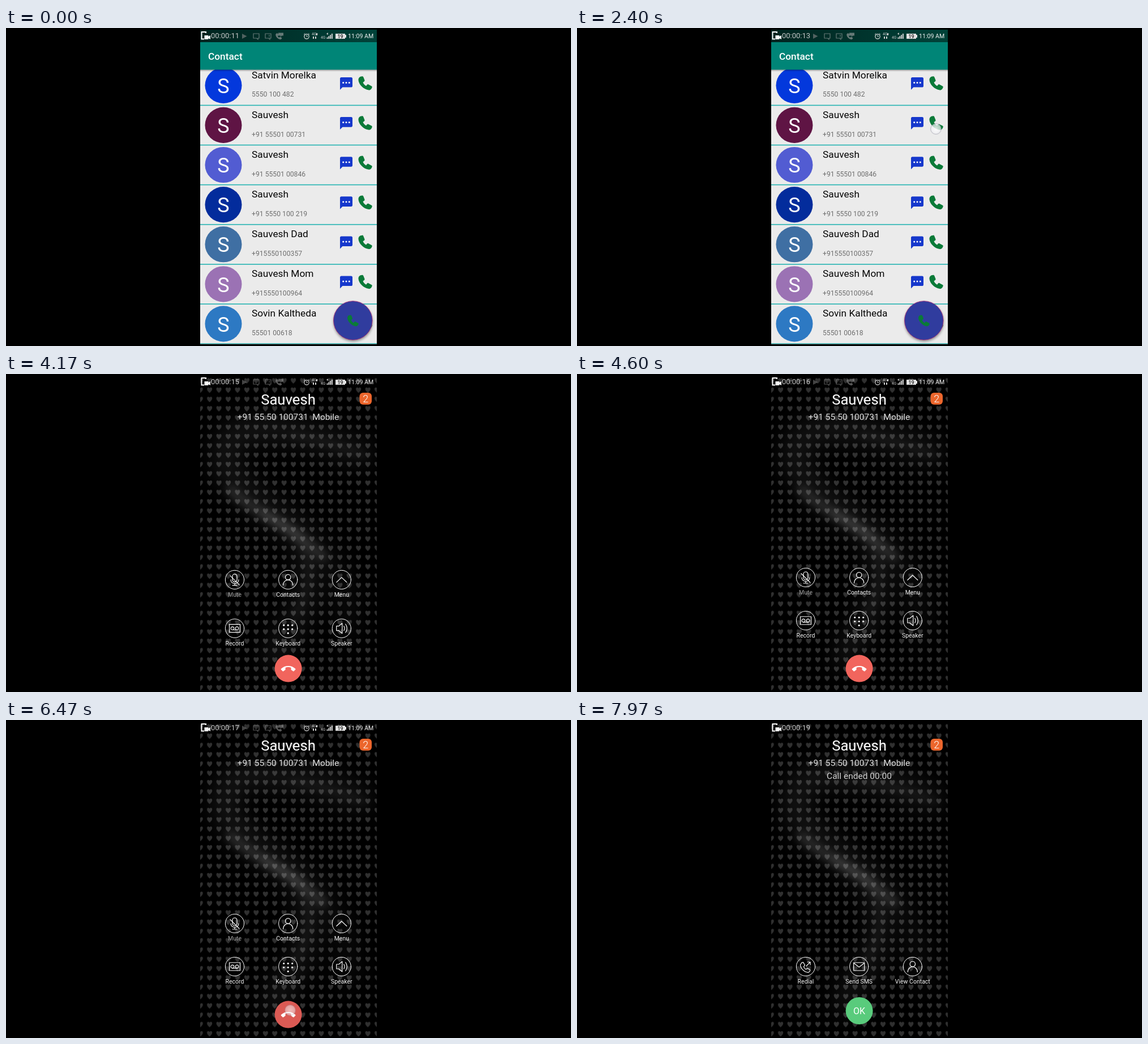
Animation of 998x561 px, one loop 8000 ms. Source, as an HTML page:

```html
<!DOCTYPE html>
<html lang="en">
<head>
<meta charset="utf-8">
<title>Contact call</title>
<style>
  html, body { margin: 0; width: 100%; height: 100%; overflow: hidden; background: #000; }
  svg { display: block; width: 998px; height: 561px; }
  text { font-family: Roboto, "Noto Sans", sans-serif; }
  .mid { text-anchor: middle; }
  .line { fill: none; stroke: #fff; stroke-width: 1.2; stroke-linecap: round; stroke-linejoin: round; }
</style>
</head>
<body>
<svg viewBox="0 0 998 561">
  <defs>
    <clipPath id="screen"><rect x="343" y="3" width="312" height="554.5"/></clipPath>
    <linearGradient id="barShade" x1="0" y1="0" x2="0" y2="1">
      <stop offset="0" stop-color="#000" stop-opacity=".36"/>
      <stop offset="1" stop-color="#000" stop-opacity="0"/>
    </linearGradient>
    <linearGradient id="statusFill">
      <stop offset="0" stop-color="#00241f"/>
      <stop offset="1" stop-color="#004239"/>
    </linearGradient>
    <radialGradient id="touchFill">
      <stop offset="0" stop-color="#fff" stop-opacity=".85"/>
      <stop offset=".8" stop-color="#f2f2f6" stop-opacity=".72"/>
      <stop offset="1" stop-color="#d0d0d8" stop-opacity=".6"/>
    </radialGradient>
    <filter id="wide" x="-50%" y="-50%" width="200%" height="200%"><feGaussianBlur stdDeviation="20"/></filter>
    <filter id="soft" x="-50%" y="-50%" width="200%" height="200%"><feGaussianBlur stdDeviation="8"/></filter>
    <filter id="fabShade" x="-30%" y="-30%" width="160%" height="160%"><feGaussianBlur stdDeviation="2.2"/></filter>
    <pattern id="hearts" x="335" y="3.7" width="16.44" height="16.41" patternUnits="userSpaceOnUse">
      <path d="M8.2 13.2C5.8 11 3.6 9 3.6 6.3C3.6 3 7.2 2.8 8.2 5.4C9.2 2.8 12.8 3 12.8 6.3C12.8 9 10.6 11 8.2 13.2Z" fill="#fff" fill-opacity=".19"/>
    </pattern>
    <path id="handset" d="M4 1L7 .5C8 .4 8.6 1 9 2L11 7C11.3 8 11 8.6 10 9.3L8.2 10.6C9 13 11 15.3 13.5 16.5L15 14.6C15.7 13.8 16.3 13.6 17.2 14L22.5 16.8C23.5 17.4 23.7 18 23.4 19C22.5 22 20.5 23.7 18 23.5C9 22.5 1 14 .6 6.5C.5 4 2 2 4 1Z"/>
    <path id="bubble" d="M20 2H4C2.9 2 2 2.9 2 4V22L6 18H20C21.1 18 22 17.1 22 16V4C22 2.9 21.1 2 20 2Z"/>
  </defs>
  <g clip-path="url(#screen)">
    <g id="list"></g>
    <g id="call">
      <rect x="343" y="3" width="312" height="555" fill="#000"/>
      <g fill="none" stroke="#fff">
        <g filter="url(#wide)">
          <path d="M640 145C520 95 380 70 385 145C390 205 470 235 535 295" stroke-width="36" opacity=".09"/>
          <path d="M525 300C550 370 525 430 485 470L470 520" stroke-width="34" opacity=".08"/>
          <path d="M540 300C590 330 612 390 600 470" stroke-width="24" opacity=".06"/>
        </g>
        <g filter="url(#soft)">
          <path d="M392 200C430 240 480 255 524 292L566 326" stroke-width="15" opacity=".14"/>
          <path d="M450 244L520 288" stroke-width="12" opacity=".1"/>
          <path d="M515 290C545 335 540 380 508 428" stroke-width="12" opacity=".05"/>
          <path d="M500 108Q570 118 640 147" stroke-width="9" opacity=".06"/>
        </g>
      </g>
      <rect x="343" y="6" width="312" height="552" fill="url(#hearts)"/>
      <rect x="624.5" y="33" width="21.5" height="21" rx="6" fill="#ec662c"/>
      <text class="mid" x="635.2" y="49.6" font-size="18" font-weight="300" fill="#fff">2</text>
      <text class="mid" x="498.5" y="53.5" font-size="25.7" fill="#fff">Sauvesh</text>
      <text class="mid" x="498.5" y="80.5" font-size="15.5" fill="#e2e2e2">+91 55 50 100731&#160;&#160;Mobile</text>
      <g id="active">
        <g id="row1"></g>
        <g id="row2"></g>
        <circle id="hangup" cx="498.6" cy="519.6" r="24"/>
        <path transform="translate(485.6 507.4) scale(1.08)" fill="#fff" d="M12 7C7.5 7 3.3 8.8 .3 11.7Q-.3 12.4 .3 13.1L2.8 15.6Q3.5 16.1 4.2 15.6Q5.4 14.4 6.8 13.7Q7.4 13.4 7.4 12.8V9.7Q12 8.3 16.6 9.7V12.8Q16.6 13.4 17.2 13.7Q18.6 14.4 19.8 15.6Q20.5 16.1 21.2 15.6L23.7 13.1Q24.3 12.4 23.7 11.7C20.7 8.8 16.5 7 12 7Z"/>
      </g>
      <g id="ended">
        <text class="mid" x="498.5" y="104" font-size="15.5" fill="#d2d2d2">Call ended 00:00</text>
        <g id="row3"></g>
        <circle cx="498.6" cy="513" r="24" fill="#59cb7c"/>
        <text class="mid" x="498.6" y="518.7" font-size="16" fill="#fff">OK</text>
      </g>
    </g>
    <g id="status"></g>
    <circle id="touch" r="9.5" fill="url(#touchFill)" stroke="#8a8a9a" stroke-opacity=".5" stroke-width=".8"/>
  </g>
</svg>
<script>
const LOOP = 8000;
const CALL_AT = 4040, END_AT = 7200;
const TICK_AT = 500;            // the recorder's clock steps here, then each second
const SLIDE = 350;              // how long the call buttons take to settle
const TOUCHES = [
  { from: 2400, to: 2530, x: 634, y: 178 },
  { from: 6400, to: 6560, x: 502, y: 512 }
];
const CONTACTS = [
  ["Satvin Morelka", "5550 100 482", "#0338dc"],
  ["Sauvesh", "+91 55501 00731", "#5f1444"],
  ["Sauvesh", "+91 55501 00846", "#525cd2"],
  ["Sauvesh", "+91 5550 100 219", "#032c9c"],
  ["Sauvesh Dad", "+915550100357", "#3f6fa3"],
  ["Sauvesh Mom", "+915550100964", "#9b72b4"],
  ["Sovin Kaltheda", "55501 00618", "#2d79c3"]
];

const $ = id => document.getElementById(id);
const show = (id, on) => $(id).setAttribute("visibility", on ? "inherit" : "hidden");
const text = (x, y, size, fill, str, extra = "") =>
  `<text x="${x}" y="${y}" font-size="${size}" fill="${fill}" ${extra}>${str}</text>`;

function contact([name, phone, color], i) {
  const y = 66 + 70.1 * i;
  const dots = [595.7, 601, 606.3].map(x =>
    `<circle cx="${x}" cy="${y + 30.5}" r="1.5" fill="#fff"/>`).join("");
  return `<ellipse cx="384" cy="${y + 35.3}" rx="32.5" ry="31.6" fill="${color}"/>
    ${text(384, y + 49, 36, "#fff", "S", 'class="mid"')}
    ${text(434, y + 22.5, 17.3, "#060606", name)}
    ${text(434, y + 55.4, 12.2, "#6f6f6f", phone)}
    <use href="#bubble" transform="translate(587.8 ${y + 18.8}) scale(1.1)" fill="#1638cc"/>${dots}
    <use href="#handset" transform="translate(621.8 ${y + 18.7}) scale(1.06)" fill="#0a7a38"/>
    <rect x="343" y="${y + 69.6}" width="312" height="1.6" fill="#25b3b1"/>`;
}

function listScreen() {
  return `<rect x="343" y="3" width="312" height="555" fill="#ebebeb"/>
    ${CONTACTS.map(contact).join("")}
    <circle cx="613" cy="518.5" r="34.5" fill="#000" opacity=".4" filter="url(#fabShade)"/>
    <circle cx="612.8" cy="516" r="34.3" fill="#303c9e" stroke="#b02a70" stroke-width=".8"/>
    <use href="#handset" transform="translate(602.5 506) scale(.86)" fill="#0a7a38"/>
    <rect x="343" y="73" width="312" height="4" fill="url(#barShade)"/>
    <rect x="343" y="25" width="312" height="48.5" fill="#008577"/>
    ${text(357, 56, 17.3, "#fff", "Contact", 'font-weight="500"')}
    <rect x="343" y="3" width="312" height="22" fill="url(#statusFill)"/>`;
}

function statusBar() {
  const bars = [0, 1, 2, 3].map(i =>
    `<rect x="${566.5 + 2.8 * i}" y="${16.5 - 2.2 * i}" width="2" height="${2.5 + 2.2 * i}"/>`).join("");
  return `<path d="M353 9V7H345.5V19.5H350" fill="none" stroke="#fff" stroke-width="2"/>
    <path d="M350.5 13H357.5V15L361 13V20L357.5 18V20H350.5Z" fill="#fff"/>
    ${text(362, 17.5, 13, "#c9c9c9", "", 'id="clock"')}
    <g id="icons">
      <g id="notices" fill="none" stroke="#aaa" stroke-width="1.2">
        <path d="M417 10L425.5 14.5L417 19Z" fill="#888" stroke="none"/>
        <path d="M437 10H447V18H445V20L442.5 18H437Z"/>
        <path d="M458 10H468V18H466V20L463.5 18H458ZM465 12V14.5M465 15.5V16.5"/>
        <use href="#handset" transform="translate(476 9) scale(.48)" fill="#aaa" stroke="none"/>
        <path d="M481 8.5H490V13.5H487L485 16V13.5H481Z" fill="#aaa" stroke="none"/>
      </g>
      <g fill="none" stroke="#d8d8d8">
        <circle cx="531" cy="15" r="4.2" stroke-width="1.2"/>
        <path d="M531 12.5V15H533M526 11.5L528.3 9.5M536 11.5L533.7 9.5"/>
      </g>
      <g fill="#cfcfcf">
        ${text(540, 13, 6.5, "#d0d0d0", "4G")}
        <path d="M549 8.5L551 11H550V13H548V11H547ZM542 15H544V19H542ZM546 15H548V19H546Z"/>
        ${text(556, 19, 6.5, "#d0d0d0", "4G")}${bars}
        <path d="M566 10.5L568.5 8L569 12Z"/>
      </g>
      <path d="M582 10H599V12H601V17H599V19H582Z" fill="#e2e2e2"/>
      ${text(590.5, 18, 9, "#222", "19", 'class="mid" font-weight="500"')}
      ${text(604, 18.3, 10.6, "#f2f2f2", "11:09 AM")}
    </g>`;
}

const person = '<circle cx="0" cy="-4.5" r="4.7"/><path d="M-8.5 9.5C-8.5-2.5 8.5-2.5 8.5 9.5"/>';
const keys = [-7.5, 0, 7.5].flatMap(x => [-5.5, 1.5].map(y => [x, y])).concat([[0, 8.5]])
  .map(([x, y]) => `<circle cx="${x}" cy="${y}" r="1.6" fill="#fff" stroke="none"/>`).join("");
const GLYPHS = {
  Mute: '<rect x="-4" y="-10" width="8" height="14" rx="4"/><path d="M-7 0C-7 9 7 9 7 0M0 7V10M-4 10H4M-8-7L8 9"/>',
  Contacts: person,
  Menu: '<path d="M-9 4.5L0-4L9 4.5"/>',
  Record: '<rect x="-9.5" y="-7" width="19" height="14"/><circle cx="-4" cy="0" r="2.8"/><circle cx="4" cy="0" r="2.8"/><path d="M-4 2.8H4"/>',
  Keyboard: keys,
  Speaker: '<path d="M-9-4H-5L1-9V9L-5 4H-9ZM4-4Q6.5 0 4 4M7-7.5Q12 0 7 7.5"/>',
  Redial: '<path transform="translate(-10 -8) scale(.78)" stroke-width="1.5" d="M4 1L7 .5L11 7L8.2 10.6C9 13 11 15.3 13.5 16.5L16.5 14L22.5 17C24 20 20.5 23.7 18 23.5C9 22.5 1 14 .6 6.5Z"/><path d="M1-1L8-8M3-8H8V-3"/>',
  "Send SMS": '<rect x="-9.5" y="-7" width="19" height="14"/><path d="M-9-6L0 1L9-6"/>',
  "View Contact": person
};

const buttonRow = (y, names) => names.map((name, i) =>
  `<g transform="translate(${[404, 498.2, 592.8][i]} ${y})">
    <g class="line"><circle r="16.6" stroke-width="1"/>${GLYPHS[name]}</g>
    ${text(0, 30.2, 10.5, name === "Mute" ? "#9a9a9a" : "#f4f4f4", name, 'class="mid"')}
  </g>`).join("");

$("list").innerHTML = listScreen();
$("status").innerHTML = statusBar();
$("row1").innerHTML = buttonRow(359, ["Mute", "Contacts", "Menu"]);
$("row2").innerHTML = buttonRow(435, ["Record", "Keyboard", "Speaker"]);
$("row3").innerHTML = buttonRow(435, ["Redial", "Send SMS", "View Contact"]);

function draw(t) {
  const calling = t >= CALL_AT, ended = t >= END_AT;
  show("list", !calling);
  show("call", calling);
  show("active", !ended);
  show("ended", ended);
  show("icons", !ended);
  $("notices").setAttribute("opacity", calling ? .5 : .6);
  $("clock").textContent = "00:00:" + (12 + Math.floor((t - TICK_AT) / 1000));

  const left = (1 - Math.min(1, Math.max(0, (t - CALL_AT) / SLIDE))) ** 3;
  $("row1").setAttribute("transform", `translate(0 ${16 * left})`);
  $("row2").setAttribute("transform", `translate(0 ${56 * left})`);

  const touch = TOUCHES.find(p => t >= p.from && t < p.to);
  show("touch", touch);
  if (touch) {
    $("touch").setAttribute("cx", touch.x);
    $("touch").setAttribute("cy", touch.y);
    $("touch").setAttribute("opacity", calling ? .7 : 1);
  }
  $("hangup").setAttribute("fill", touch && calling ? "#db5a54" : "#f1655d");
}

const start = performance.now();
function tick() {
  draw((performance.now() - start) % LOOP);
  requestAnimationFrame(tick);
}
tick();
</script>
</body>
</html>
```
